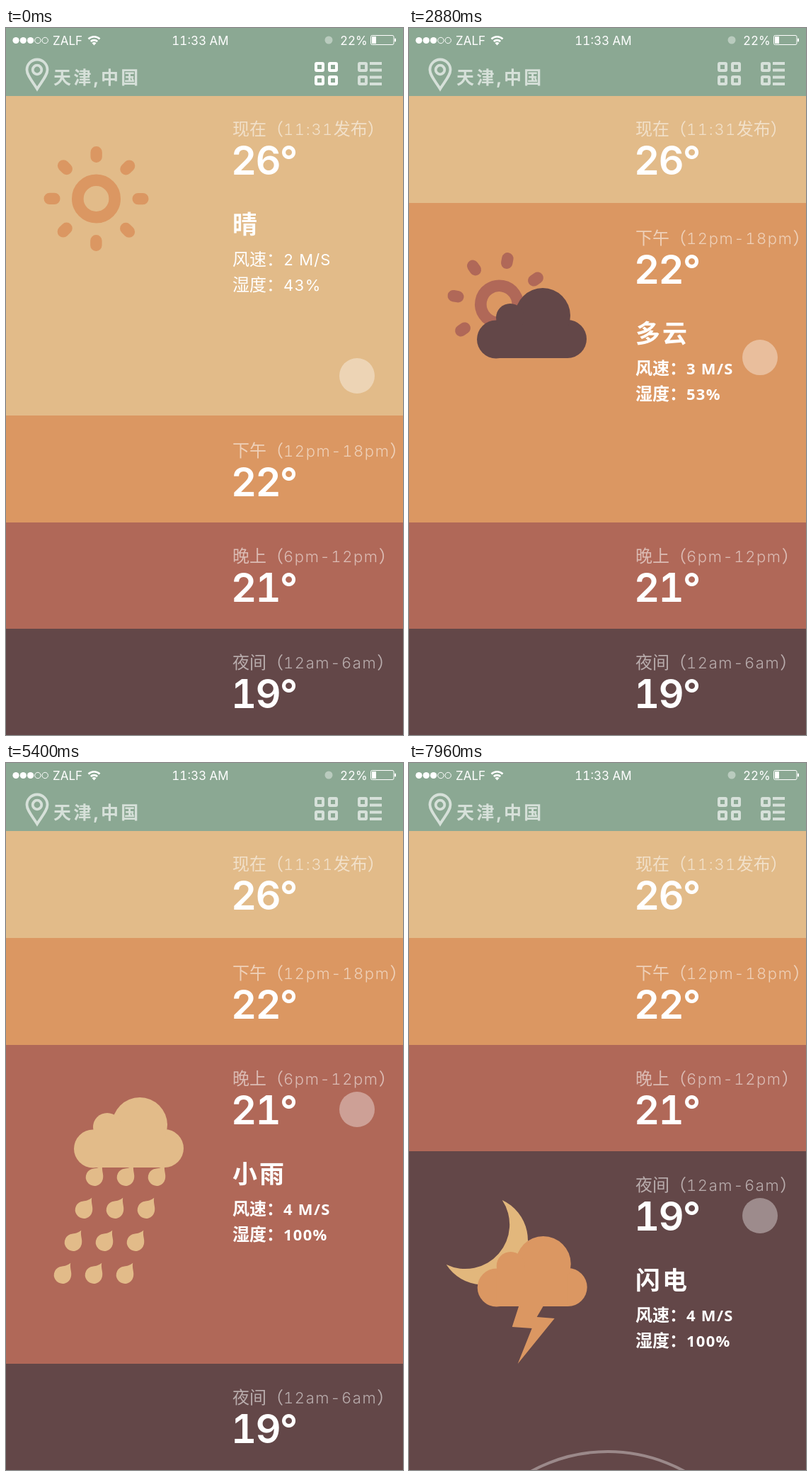
An HTML page for the animation above (8000 ms loop, 561 px wide and 998 px high).

```html
<!DOCTYPE html>
<html lang="zh-CN">
<head>
<meta charset="utf-8">
<title>Weather</title>
<style>
  html, body { margin: 0; width: 100%; height: 100%; overflow: hidden; background: #634748; }
  #stage { display: block; width: 561px; height: 998px; }
  text { fill: #fff; font-family: Inter, "Noto Sans CJK SC", "Noto Sans CJK", sans-serif; font-variant-numeric: tabular-nums; white-space: pre; }
  .zh { font-family: "Noto Sans CJK SC", "Noto Sans CJK", sans-serif; font-size: 24px; }
  .en { font-size: 22px; letter-spacing: 1.6px; }
  .label { font-weight: 300; opacity: .55; }
  .temp { font-size: 56px; font-weight: 600; letter-spacing: -1.8px; }
  .title .zh { font-size: 35px; letter-spacing: 3px; font-weight: 700; }
  .info .en { letter-spacing: 1.1px; }
  .bold .zh { font-weight: 700; }
  .bold .en { font: 700 22px "Open Sans", sans-serif; letter-spacing: 1.3px; }
  .status { font-size: 17px; }
  .city { font-weight: 700; }
  .city .zh, .city .en { font-size: 25px; letter-spacing: 3.4px; }
</style>
</head>
<body>
<svg id="stage" viewBox="0 0 561 998"></svg>
<script>
const LOOP = 8000;
const CREAM = '#e2bb89', ORANGE = '#db9762', RED = '#b06858', PLUM = '#634748';

const panels = [
  { color: CREAM, rest: 96, dy: 0, label: '现在（11:31发布）', temp: '26°', title: '晴', wind: '2 M/S', wet: '43%' },
  { color: ORANGE, rest: 547, dy: 3, label: '下午（12pm-18pm）', temp: '22°', title: '多云', wind: '3 M/S', wet: '53%' },
  { color: RED, rest: 698, dy: 1, label: '晚上（6pm-12pm）', temp: '21°', title: '小雨', wind: '4 M/S', wet: '100%' },
  { color: PLUM, rest: 848, dy: 1, label: '夜间（12am-6am）', temp: '19°', title: '闪电', wind: '4 M/S', wet: '100%' }
];
const starts = [0, 360, 2955, 5640];
const PANEL_TIME = 1470, ICON_TIME = 2010;

// Split a string into Chinese and Latin runs, each with its own style
const runs = s => s.replace(/[\x20-\xff]+|[^\x20-\xff]+/g,
  r => `<tspan class="${r.charCodeAt(0) < 256 ? 'en' : 'zh'}">${r}</tspan>`);
const text = (cls, x, y, s) => `<text class="${cls}" x="${x}" y="${y}">${s}</text>`;
const rect = (x, y, w, h, rest = '') => `<rect x="${x}" y="${y}" width="${w}" height="${h}" ${rest}/>`;
const circle = (x, y, r, rest = '') => `<circle cx="${x}" cy="${y}" r="${r}" ${rest}/>`;
const list = (n, fn) => Array.from({ length: n }, (_, i) => fn(i)).join('');

const sun = color => `<g class="sun" fill="${color}">
  ${circle(0, 0, 26.2, `fill="none" stroke="${color}" stroke-width="16.6"`)}
  ${list(8, i => rect(-8.2, -74, 16.4, 23, `rx="8.2" transform="rotate(${i * 45})"`))}</g>`;

// The cloud stands on y = 0
const cloudShape = color => `<g fill="${color}">
  ${circle(123, -26.5, 27)}${circle(224, -27, 27)}${circle(189, -60, 39)}${circle(143, -57, 20)}
  ${rect(123, -45, 101, 45)}</g>`;
const cloud = inner => `<g class="cloud">${inner}</g>`;

const drop = x => `<path transform="translate(${x})"
  d="M11.5-17C10-9 14-4 12 3A12.2 12.2 0 1 1-4-11.5C3-13 7-13 11.5-17Z"/>`;
const rain = `<g fill="${CREAM}">${list(5, () =>
  `<g class="row">${[124, 168, 212].map(drop).join('')}</g>`)}</g>`;

const storm = `<g transform="translate(.7)">
  <path fill="#e2b77c" d="M131-150A62.7 62.7 0 1 1 52-59A62.5 62.5 0 0 0 131-150Z"/>
  ${cloudShape(ORANGE)}
  <path fill="${ORANGE}" d="M155-2L145 29 173 31 153 81 205 17 180 15 190-2Z"/></g>`;

const icons = [
  sun(ORANGE),
  sun(RED) + cloud(cloudShape(PLUM)),
  cloud(rain + cloudShape(CREAM)),
  cloud(storm)
];

const panelMarkup = (p, i) => `<svg class="panel" width="561" height="998">
  ${rect(0, 0, 561, 998, `fill="${p.color}"`)}
  <g class="fixed">${icons[i]}</g>
  <g transform="translate(0 ${p.dy})">
    ${text('label', 320, 55, runs(p.label))}
    ${text('temp', 318, 111, p.temp)}
    <g class="detail ${i ? 'bold' : ''}">
      ${text('title', 320, 194, runs(p.title))}
      ${text('info', 320, 239, runs('风速：' + p.wind))}
      ${text('info', 320, 275, runs('湿度：' + p.wet))}
    </g>
  </g></svg>`;

const outline = 'fill="none" stroke="#fff"';
const box = (x, y) => rect(x, y, 10, 10, `rx="1" ${outline} stroke-width="4"`);
const header = `${rect(0, 0, 561, 96, 'fill="#8ba893"')}
  ${list(5, i => i < 3 ? circle(14 + i * 10.3, 17.5, 4.6, 'fill="#fff"')
                       : circle(14 + i * 10.3, 17.5, 4.2, outline))}
  ${text('status', 66, 24, 'ZALF')}
  <g ${outline} stroke-width="2.6">
    <path d="M116.5 15.5a11.5 11.5 0 0 1 16 0M119.8 19a6.8 6.8 0 0 1 9.4 0"/></g>
  <path fill="#fff" d="M124.5 24.5l-3-3.2a4.2 4.2 0 0 1 6 0Z"/>
  <text class="status" x="274.5" y="23.5" text-anchor="middle">11:33 AM</text>
  ${circle(456, 17, 5.5, 'fill="#fff" opacity=".4"')}
  ${text('status', 472, 23.5, '22%')}
  ${rect(515.5, 10.5, 32.5, 13, `rx="2" ${outline}`)}
  ${rect(517, 12, 6, 10, 'fill="#fff"')}${rect(549, 14.5, 2, 5, 'rx="1" fill="#fff"')}
  <g opacity=".65">
    <g ${outline} stroke-width="3.8">
      <path d="M44 86C38 76 29.5 67 29.5 59a14.5 14.5 0 0 1 29 0C58.5 67 50 76 44 86Z"/>
      ${circle(44, 59, 6.3)}</g>
    ${text('city', 67, 79, runs('天津,中国'))}
    ${box(499, 50)}${box(499, 69)}
    ${[48, 57.5, 67.5, 77].map(y => rect(514, y, 17, 4, 'fill="#fff"')).join('')}
  </g>
  <g id="grid">${box(438, 50)}${box(457, 50)}${box(438, 69)}${box(457, 69)}</g>`;

const stage = document.getElementById('stage');
stage.innerHTML = panels.map(panelMarkup).join('') +
  circle(281, 1300, 225, `id="arc" ${outline} stroke-width="4" opacity=".36"`) +
  circle(496, 491, 25, 'id="touch" fill="#fff" opacity=".37"') + header;

const all = s => [...stage.querySelectorAll(s)];
const panelEls = all('.panel'), fixedEls = all('.fixed'), detailEls = all('.detail');
const sunEls = all('.sun'), cloudEls = all('.cloud'), rowEls = all('.row');
const [touch, arc, grid] = ['touch', 'arc', 'grid'].map(id => document.getElementById(id));

const clamp = x => Math.min(1, Math.max(0, x));
const ease = x => (x = clamp(x), x * x * (3 - 2 * x));
const move = (el, x, y, more = '') => el.setAttribute('transform', `translate(${x} ${y})${more}`);

function draw(t) {
  const icon = starts.map(s => ease((t - s) / ICON_TIME));
  let touchY = 491;

  panels.forEach((p, i) => {
    const top = p.rest - (i ? 300 * ease((t - starts[i]) / PANEL_TIME) : 0);
    panelEls[i].setAttribute('y', top);
    move(fixedEls[i], 0, -top);
    if (!i) return;
    // The detail block rises from below to its place in the open panel
    move(detailEls[i], 0, p.rest - 300 - top + 705 * (1 - icon[i]));
    touchY += (top + 91 - touchY) * ease((t - starts[i] + 158) / 240);
  });
  touch.setAttribute('cy', touchY);

  const sunY = 241 + 149 * (icon[1] + icon[2]);
  const cloudY = 311 + 155 * icon[1] + 105 * icon[2] + 196 * icon[3];
  sunEls.forEach(el => move(el, 127.5, sunY, ` rotate(${t * 360 / 2800})`));
  cloudEls.forEach(el => move(el, 0, cloudY));

  const fall = (t + 160) / 800 % 1;
  rowEls.forEach((el, i) => {
    const k = i - 1 + fall, y = 16 + 46 * k;
    move(el, -15 * k, y);
    el.setAttribute('opacity', clamp((190 - y) / 38));
  });

  grid.setAttribute('opacity', 1 - .35 * clamp(t / 1000));
  arc.setAttribute('cy', 1227 - 30 * clamp((t - 7560) / 400));
}

function frame() {
  draw(performance.now() % LOOP);
  requestAnimationFrame(frame);
}
frame();
</script>
</body>
</html>
```
